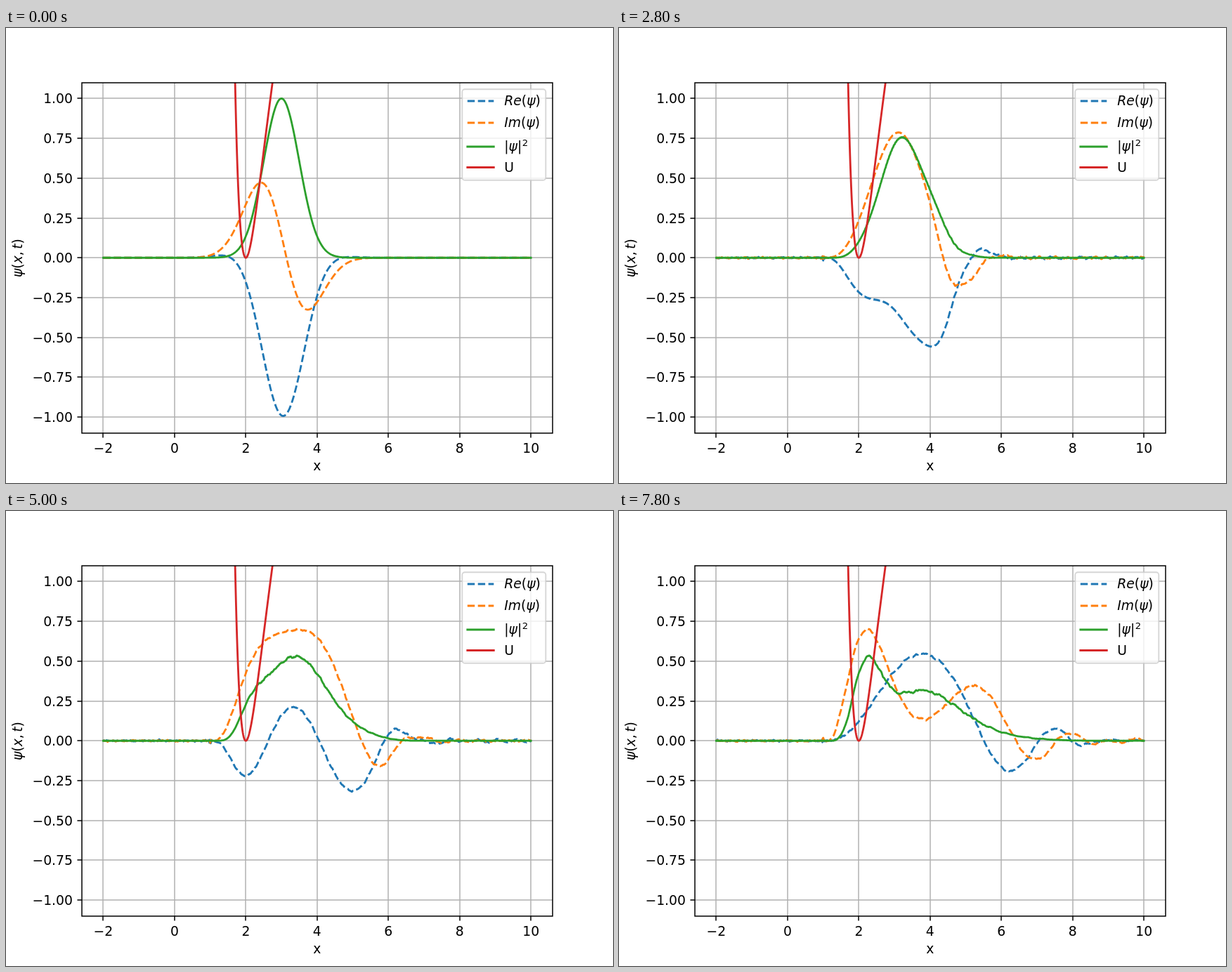
Recreate the animation shown at these times as an HTML page with a canvas. Size 864x648 px, loop 8000 ms.

```html
<!DOCTYPE html>
<html lang="en">
<head>
<meta charset="utf-8">
<title>Wave packet</title>
<style>
  html, body { margin: 0; width: 100%; height: 100%; overflow: hidden; background: #fff; }
  canvas { display: block; width: 864px; height: 648px; }
</style>
</head>
<body>
<canvas id="plot" width="864" height="648"></canvas>
<script>
const ctx = document.getElementById('plot').getContext('2d');

// Physics, with hbar = m = 1
const N = 1000, X0 = -2, X1 = 10;
const DX = (X1 - X0) / (N - 1), DT = 0.001;
const STEPS = 30, FRAMES = 40, HOLD = 200;

// Layout in pixels
const BOX = { x: 108, y: 77.76, w: 669.6, h: 498.96 };
const SIZE = 18.75, THIN = 1.5, THICK = 2.8125;
const DASH = [10.406, 4.5];
const BLUE = '#1f77b4', ORANGE = '#ff7f0e', GREEN = '#2ca02c', RED = '#d62728';

const px = x => BOX.x + BOX.w * ((x - X0) / (X1 - X0) + 0.05) / 1.1;
const py = y => BOX.y + BOX.h * (1.1 - y) / 2.2;

const xs = Float64Array.from({ length: N }, (_, j) => X0 + j * DX);
const U = xs.map(x => 6 * ((x - 2) / (x - 1)) ** 2);

// Crank-Nicolson: solve (1 + iH dt/2) chi = 2 psi, then psi <- chi - psi
function simulate() {
  const re = xs.map(x => Math.exp(-((x - 3) ** 2)) * Math.cos(x));
  const im = xs.map(x => Math.exp(-((x - 3) ** 2)) * Math.sin(x));
  const b = -DT / (4 * DX * DX);
  const invR = new Float64Array(N), invI = new Float64Array(N);
  const mulR = new Float64Array(N), mulI = new Float64Array(N);
  for (let j = 0; j < N; j++) {
    let wr = 1, wi = DT / 2 * (1 / (DX * DX) + U[j]);
    if (j) {
      wr += b * b * invR[j - 1];
      wi += b * b * invI[j - 1];
    }
    const d = wr * wr + wi * wi;
    invR[j] = wr / d;
    invI[j] = -wi / d;
    mulR[j] = -b * invI[j];
    mulI[j] = b * invR[j];
  }

  const gr = new Float64Array(N), gi = new Float64Array(N);
  function step() {
    let r = 0, i = 0;
    for (let j = 0; j < N; j++) {
      const mr = j ? mulR[j - 1] : 0, mi = j ? mulI[j - 1] : 0;
      const nr = 2 * re[j] - (mr * r - mi * i);
      i = 2 * im[j] - (mr * i + mi * r);
      r = nr;
      gr[j] = r;
      gi[j] = i;
    }
    r = i = 0;
    for (let j = N - 1; j >= 0; j--) {
      const nr = invR[j] * gr[j] - invI[j] * gi[j] - (mulR[j] * r - mulI[j] * i);
      i = invR[j] * gi[j] + invI[j] * gr[j] - (mulR[j] * i + mulI[j] * r);
      r = nr;
      re[j] = r - re[j];
      im[j] = i - im[j];
    }
  }

  const states = [];
  for (let n = 0; n < FRAMES; n++) {
    states.push({ re: re.slice(), im: im.slice(), rho: re.map((v, j) => v * v + im[j] * im[j]) });
    for (let s = 0; s < STEPS; s++) step();
  }
  return states;
}

function segment(x0, y0, x1, y1, color, width) {
  ctx.strokeStyle = color;
  ctx.lineWidth = width;
  ctx.beginPath();
  ctx.moveTo(x0, y0);
  ctx.lineTo(x1, y1);
  ctx.stroke();
}

function curve(values, color, dashed) {
  ctx.strokeStyle = color;
  ctx.lineWidth = THICK;
  ctx.lineJoin = 'round';
  ctx.lineCap = dashed ? 'butt' : 'square';
  ctx.setLineDash(dashed ? DASH : []);
  ctx.beginPath();
  for (let j = 0; j < N; j++) ctx.lineTo(px(xs[j]), py(Math.min(values[j], 3)));
  ctx.stroke();
  ctx.setLineDash([]);
  ctx.lineCap = 'butt';
}

function setFont(italic, size = SIZE) {
  ctx.font = `${italic ? 'italic ' : ''}${size}px "DejaVu Sans", sans-serif`;
}

function label(text, x, y, align) {
  setFont(false);
  ctx.fillStyle = '#000';
  ctx.textAlign = align;
  ctx.fillText(text, x, y);
}

// Letters are slanted, punctuation upright; a space is a thin gap
function math(text, x, y) {
  ctx.fillStyle = '#000';
  ctx.textAlign = 'left';
  for (const c of text) {
    if (c === ' ') { x += 3.5; continue; }
    setFont(/[a-zψ]/i.test(c));
    ctx.fillText(c, x, y);
    x += ctx.measureText(c).width;
  }
  return x;
}

const signed = (v, digits) => (v < 0 ? '\u2212' : '') + Math.abs(v).toFixed(digits);
const xTicks = [-2, 0, 2, 4, 6, 8, 10];
const yTicks = Array.from({ length: 9 }, (_, k) => 1 - k / 4);

function drawGrid() {
  for (const v of xTicks) {
    const x = Math.round(px(v));
    segment(x, 78, x, 577, '#b0b0b0', THIN);
  }
  for (const v of yTicks) {
    const y = Math.round(py(v));
    segment(108, y, 778, y, '#b0b0b0', THIN);
  }
}

function drawAxes() {
  for (const v of xTicks) {
    const x = Math.round(px(v));
    segment(x, 577, x, 583.56, '#000', THIN);
    label(signed(v, 0), px(v), 605, 'center');
  }
  for (const v of yTicks) {
    const y = Math.round(py(v));
    segment(101.44, y, 108, y, '#000', THIN);
    label(signed(v, 2), 94.9, y + 7, 'right');
  }
  ctx.strokeStyle = '#000';
  ctx.lineWidth = THIN;
  ctx.lineJoin = 'miter';
  ctx.strokeRect(108, 78, 670, 499);

  label('x', px(4), 630, 'center');
  ctx.save();
  ctx.translate(23, 355);
  ctx.rotate(-Math.PI / 2);
  math('ψ(x, t)', 0, 0);
  ctx.restore();
}

function drawLegend() {
  ctx.beginPath();
  ctx.roundRect(649.3, 87.2, 119, 129.6, 3.75);
  ctx.fillStyle = 'rgba(255,255,255,0.8)';
  ctx.fill();
  ctx.strokeStyle = 'rgba(204,204,204,0.8)';
  ctx.lineWidth = 1.875;
  ctx.stroke();

  const key = (y, color, dashed) => {
    ctx.setLineDash(dashed ? DASH : []);
    ctx.lineCap = dashed ? 'butt' : 'square';
    segment(656.8, y, 694.3, y, color, THICK);
    ctx.setLineDash([]);
    ctx.lineCap = 'butt';
  };
  key(104, BLUE, true);
  key(135, ORANGE, true);
  key(169, GREEN, false);
  key(198.5, RED, false);
  math('Re(ψ)', 709.3, 110);
  math('Im(ψ)', 709.3, 141);
  const end = math('|ψ|', 709.3, 175);
  setFont(false, SIZE * 0.7);
  ctx.fillText('2', end + 0.5, 168);
  label('U', 709.3, 205, 'left');
}

function draw({ re, im, rho }) {
  ctx.fillStyle = '#fff';
  ctx.fillRect(0, 0, 864, 648);
  drawGrid();
  ctx.save();
  ctx.beginPath();
  ctx.rect(BOX.x, BOX.y, BOX.w, BOX.h);
  ctx.clip();
  curve(re, BLUE, true);
  curve(im, ORANGE, true);
  curve(rho, GREEN, false);
  curve(U, RED, false);
  ctx.restore();
  drawAxes();
  drawLegend();
}

const states = simulate();
const start = performance.now();
let shown = -1;

function tick() {
  const n = Math.floor((performance.now() - start) / HOLD) % FRAMES;
  if (n !== shown) draw(states[shown = n]);
  requestAnimationFrame(tick);
}
tick();
</script>
</body>
</html>
```
